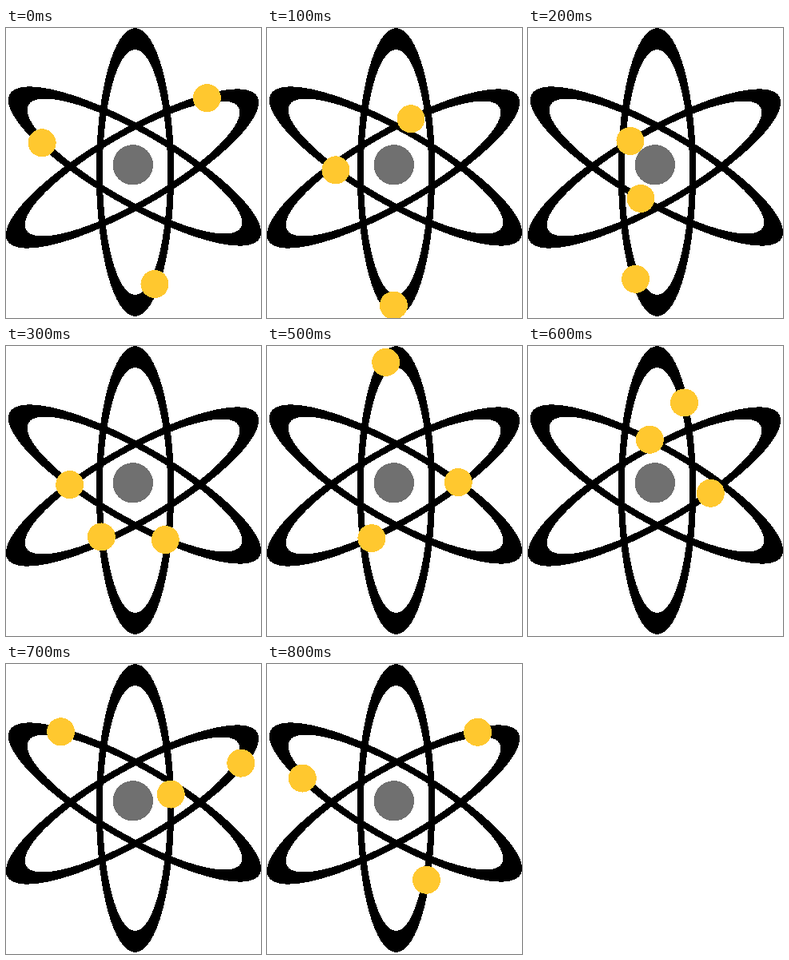
Recreate the animation shown at these times as an HTML page. Size 319 px wide and 363 px high, loop 900 ms.

```html
<!DOCTYPE html>
<html lang="en">
<head>
<meta charset="utf-8">
<title>Atom</title>
<style>
  html, body { margin: 0; width: 100%; height: 100%; overflow: hidden; background: #fff; }
  svg { display: block; width: 319px; height: 363px; }
</style>
</head>
<body>
<svg viewBox="0 0 319 363" shape-rendering="crispEdges">
  <defs>
    <!-- Outer ellipse minus a smaller one: thick at the tips, thin at the sides -->
    <path id="ring" fill-rule="evenodd"
      d="M-48.7 0a48.7 180.5 0 1 0 97.4 0a48.7 180.5 0 1 0 -97.4 0z
         M-40.7 0a40.7 153.5 0 1 0 81.4 0a40.7 153.5 0 1 0 -81.4 0z"/>
  </defs>
  <g id="rings"></g>
  <circle cx="158.8" cy="171.3" r="25.2" fill="#707070"/>
  <g id="electrons" fill="#ffc82f"></g>
</svg>
<script>
  const STEP = 100, STEPS = 9;
  const TRACK = { rx: 45, ry: 167 };
  const RAD = Math.PI / 180;

  // keys: [step, angle in degrees along the ring]; the motion is linear between them
  const orbits = [
    { x: 161.5, y: 180.5, tilt: 0,
      keys: [[0, 57], [1, 94], [3, 159.5], [5, 253.5], [6, 319], [7, 354], [8, 392.5]] },
    { x: 158, y: 176, tilt: 60,
      keys: [[0, 228.5], [1, 197.5], [3, 156.5], [5, 19.5], [7, -59.3], [8, -125]] },
    { x: 161, y: 173, tilt: -60,
      keys: [[0, 223.5], [1, 202], [3, 156], [5, 23.5], [7, -48], [8, -136]] }
  ];

  function add(parentId, tag, attributes) {
    const node = document.createElementNS('http://www.w3.org/2000/svg', tag);
    for (const name in attributes) node.setAttribute(name, attributes[name]);
    return document.getElementById(parentId).appendChild(node);
  }

  for (const orbit of orbits) {
    const transform = `translate(${orbit.x} ${orbit.y}) rotate(${orbit.tilt})`;
    add('rings', 'use', { href: '#ring', transform });
    orbit.electron = add('electrons', 'circle', { r: 17.5, transform });
  }

  function angleAt(keys, step) {
    const next = keys.findIndex(([at]) => at > step);
    if (next < 0) return keys[keys.length - 1][1];
    const [t0, a0] = keys[next - 1], [t1, a1] = keys[next];
    return a0 + (a1 - a0) * (step - t0) / (t1 - t0);
  }

  function draw(time) {
    const step = Math.floor(Math.max(0, time) / STEP) % STEPS;
    for (const { keys, electron } of orbits) {
      const angle = angleAt(keys, step) * RAD;
      electron.setAttribute('cx', TRACK.rx * Math.cos(angle));
      electron.setAttribute('cy', TRACK.ry * Math.sin(angle));
    }
  }

  const start = performance.now();
  function tick(now) {
    draw(now - start);
    requestAnimationFrame(tick);
  }
  draw(0);
  requestAnimationFrame(tick);
</script>
</body>
</html>
```
